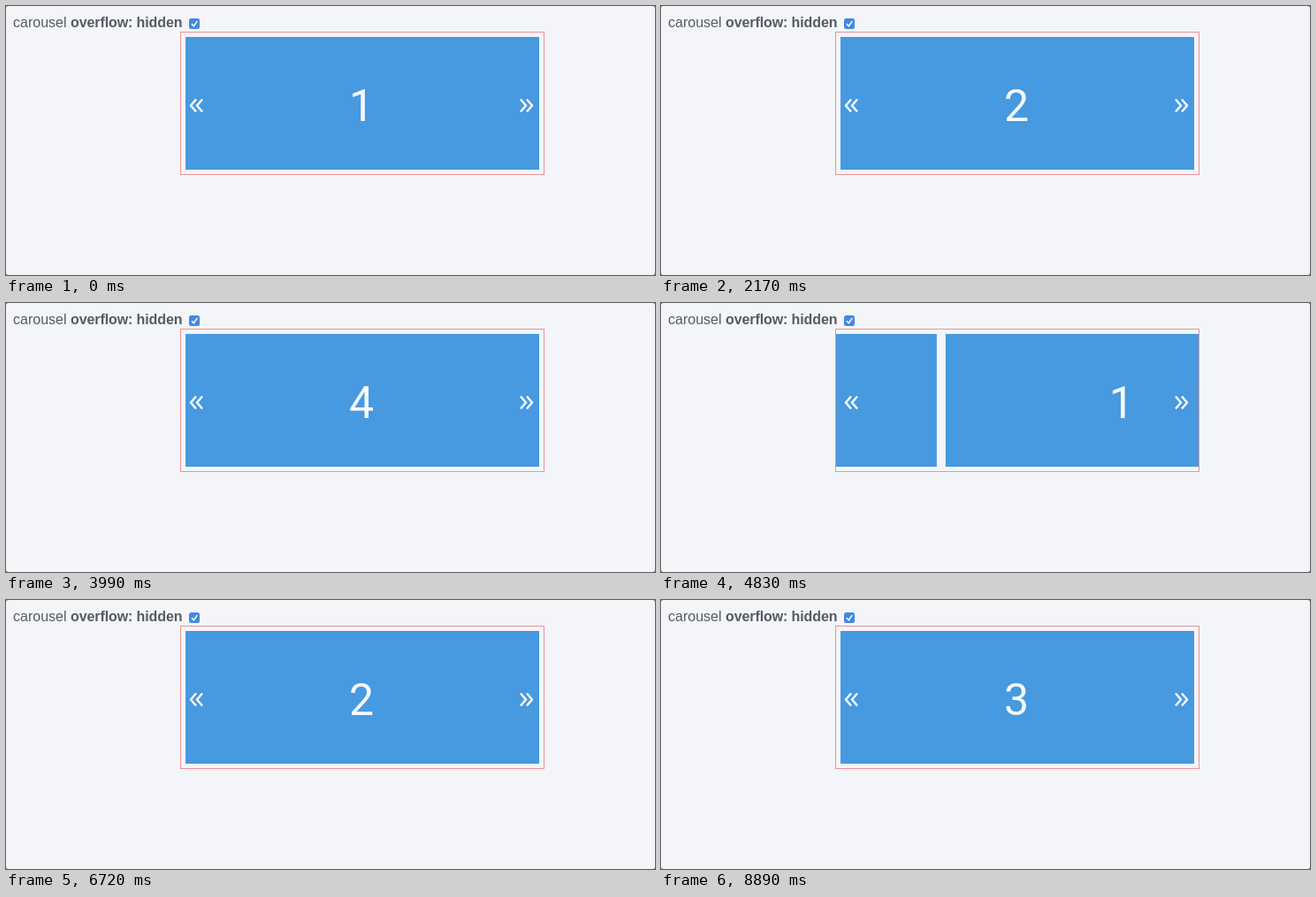
An HTML page that plays this animation: 734x304 px, repeating every 8960 ms.

```html
<!DOCTYPE html>
<html lang="en">
<head>
<meta charset="utf-8">
<title>Carousel</title>
<style>
  html, body { margin: 0; width: 100%; height: 100%; overflow: hidden; background: #777; }
  svg { display: block; }
  .label { font: 16px "Liberation Sans", Arial, sans-serif; fill: #555b66; }
  .bold { font-weight: bold; letter-spacing: -.1px; }
  .digit { font: 50px Roboto, sans-serif; fill: #f6fafd; text-anchor: middle; }
  .arrow { fill: none; stroke: #fff; stroke-width: 2.4; }
</style>
</head>
<body>
<svg width="734" height="304" viewBox="0 0 734 304">
  <defs>
    <clipPath id="viewport"><rect x="198" y="30" width="410" height="160"/></clipPath>
  </defs>
  <rect width="734" height="304" rx="3" fill="#f4f5f8"/>
  <text class="label" x="8" y="24">carousel</text>
  <text class="label bold" x="73" y="24">overflow: hidden</text>
  <rect x="207" y="14" width="12" height="12" rx="2.5" fill="#438ae0"/>
  <path d="M210 20.2l2.3 2.5 4-5.6" fill="none" stroke="#fff" stroke-width="1.5"/>
  <g clip-path="url(#viewport)"><g id="track"></g></g>
  <rect x="197.5" y="29.5" width="411" height="161" fill="none" stroke="#dc2f45" stroke-dasharray="1 1"/>
  <path class="arrow" d="M215 105.5l-6 7 6 7M222 105.5l-6 7 6 7"/>
  <path class="arrow" d="M582 105.5l6 7-6 7M589 105.5l6 7-6 7"/>
</svg>
<script>
const LOOP = 8960, STEP = 70, PITCH = 410, DURATION = 500;
const starts = [770, 2575, 3430, 4620, 5880, 7420];
const track = document.getElementById("track");

// The four slides repeat, so the step from 4 to 1 also runs forward.
track.innerHTML = Array.from({ length: starts.length + 1 }, (_, i) => `
  <rect x="${203 + i * PITCH}" y="35" width="400" height="150" fill="#4799e0"/>
  <text class="digit" x="${402 + i * PITCH}" y="129.5">${i % 4 + 1}</text>`).join("");

// cubic-bezier(.25, .1, .25, 1)
function ease(x) {
  if (x <= 0) return 0;
  if (x >= 1) return 1;
  const curve = (s, a, b) => 3 * (1 - s) ** 2 * s * a + 3 * (1 - s) * s * s * b + s ** 3;
  let low = 0, high = 1;
  for (let i = 0; i < 20; i++) {
    const mid = (low + high) / 2;
    if (curve(mid, .25, .25) < x) low = mid; else high = mid;
  }
  return curve(low, .1, 1);
}

function draw(now) {
  const time = Math.floor(now % LOOP / STEP) * STEP;
  const position = starts.reduce((sum, start) => sum + ease((time - start) / DURATION), 0);
  track.setAttribute("transform", `translate(${-position * PITCH} 0)`);
}

const origin = performance.now();
function tick() {
  draw(performance.now() - origin);
  requestAnimationFrame(tick);
}
tick();
</script>
</body>
</html>
```
